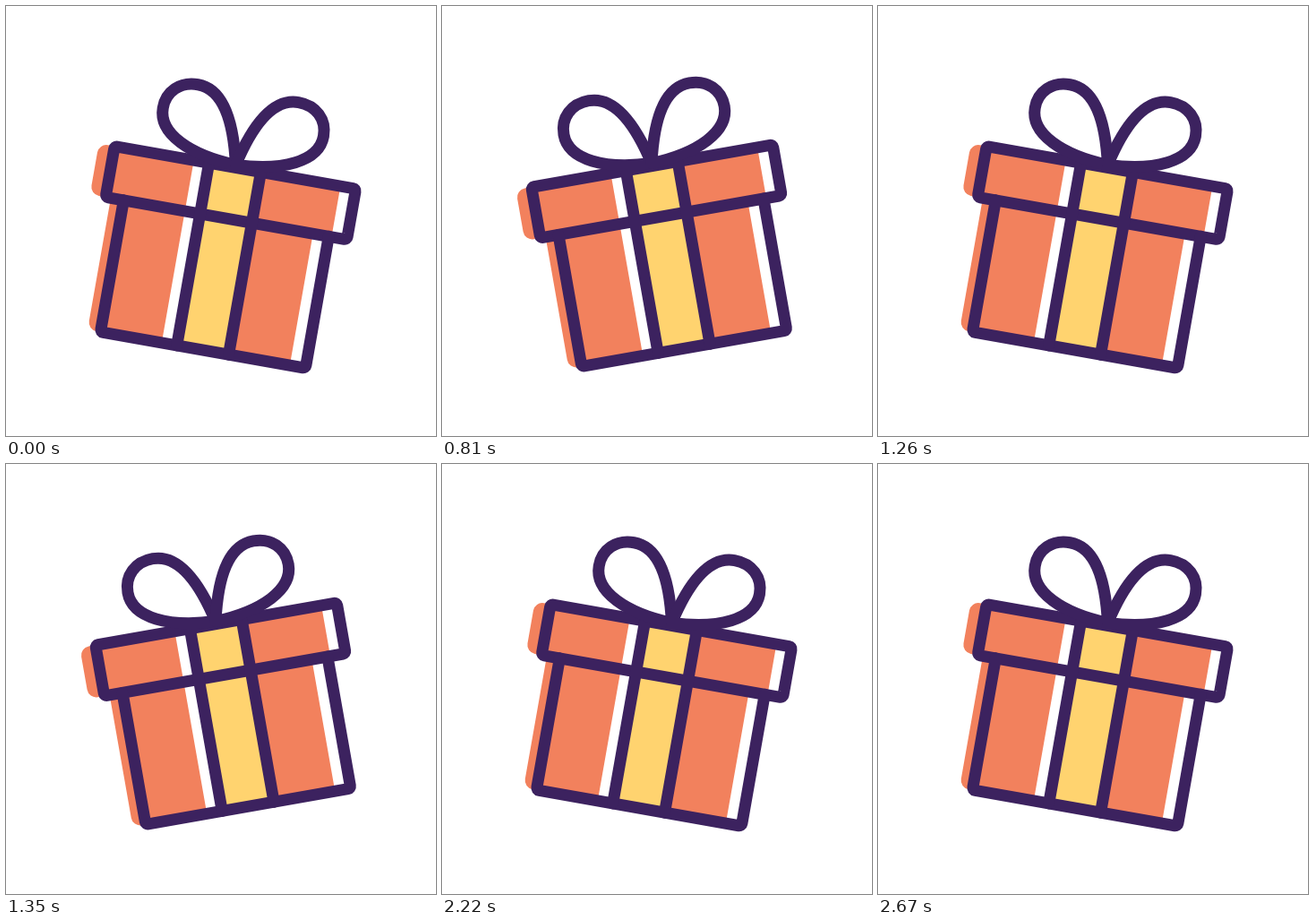
Write an HTML page that moves like this. It is 480x480 px and loops after 2700 ms.

```html
<!DOCTYPE html>
<html lang="en">
<head>
<meta charset="utf-8">
<title>Shaking gift</title>
<style>
  html, body { margin: 0; width: 100%; height: 100%; overflow: hidden; background: #fff; }
  svg { display: block; width: 100%; height: 100%; }
  .line { fill: none; stroke: #3c225f; stroke-width: 13; stroke-linejoin: round; stroke-linecap: round; }
  .orange { fill: #f2815d; }
  .yellow { fill: #ffd36f; }
</style>
</head>
<body>
<svg viewBox="0 0 480 480">
  <defs>
    <path id="loop" d="M0-64.5C-9-104-25-145.5-57-145.5C-77-145.5-91-132-91-113C-91-84-52-66.5 0-64.5"/>
  </defs>
  <g id="gift">
    <g class="orange">
      <path d="M-41.6-61.5H-139.2a10 10 0 0 0-10 10V-14a10 10 0 0 0 10 10H-41.6Z"/>
      <path d="M-41.6-4H-125.6V135.4a10 10 0 0 0 10 10H-41.6Z"/>
      <path d="M34.3-61.5H124.6V-4H103.6V145.4H34.3Z"/>
    </g>
    <rect class="yellow" x="-24.4" y="-61.5" width="58.7" height="207"/>
    <g class="line">
      <rect x="-131.5" y="-61.5" width="273.5" height="57.6" rx="3"/>
      <path d="M-111-3.9V142.4a3 3 0 0 0 3 3H118.4a3 3 0 0 0 3-3V-3.9"/>
      <path d="M-24.4-61.5V145.4M34.3-61.5V145.4"/>
      <g transform="translate(5.3 0)">
        <use href="#loop"/>
        <use href="#loop" transform="scale(-1 1)"/>
      </g>
    </g>
  </g>
</svg>
<script>
  const LOOP = 2700, STEP = 30, TILT = 10;
  const gift = document.getElementById('gift');
  const last = LOOP / STEP - 1;

  // The tilt flips on every step; the closing step rests on the opening pose.
  function draw(ms) {
    const step = Math.floor((ms % LOOP + 0.01) / STEP);
    const right = step % 2 === 0 || step === last;
    gift.setAttribute('transform', `translate(240 240) rotate(${right ? TILT : -TILT})`);
  }

  function tick() {
    draw(performance.now());
    requestAnimationFrame(tick);
  }
  draw(0);
  requestAnimationFrame(tick);
</script>
</body>
</html>
```
